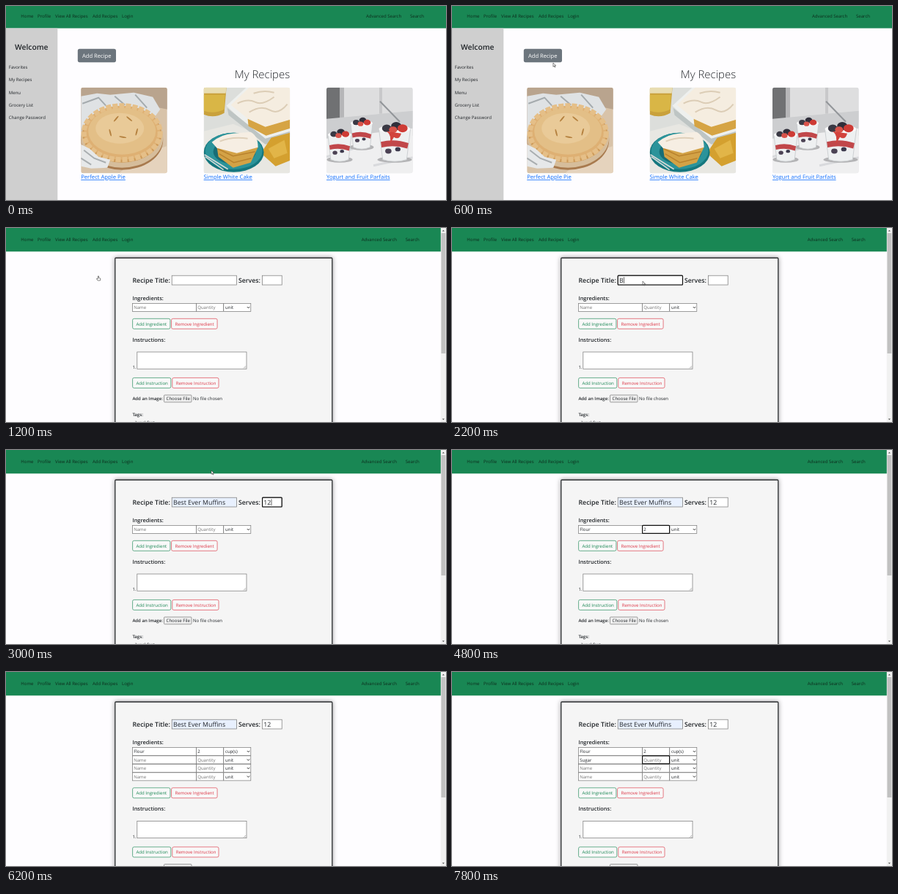
These frames come from a looping animation (600x266 px, 8 s). An HTML page:

```html
<!DOCTYPE html>
<html lang="en">
<head>
<meta charset="utf-8">
<title>My Recipes</title>
<style>
html, body { margin: 0; width: 100%; height: 100%; overflow: hidden; background: #fefdff; }
svg { display: block; width: 600px; height: 266px; }
text { font-family: "Open Sans", "Noto Sans", sans-serif; font-size: 6.05px; fill: #212529; text-rendering: geometricPrecision; white-space: pre; }
.b { font-weight: 600; }
.nav text { fill: #0d2d1d; }
.link { fill: #0d6efd; font-size: 7.68px; text-decoration: underline; }
.box { fill: #fff; stroke: #767676; stroke-width: .7; }
.hint { fill: #757575; }
#card { fill: #f5f5f5; stroke: #2b2e30; stroke-width: 1.3; filter: drop-shadow(0 0 3px rgba(0,0,0,.4)); }
#focus { fill: none; stroke: #101010; stroke-width: 1.2; }
</style>
</head>
<body>
<svg id="stage" viewBox="0 0 600 266"></svg>
<script>
const LOOP = 8000, STEP = 200, ROW = 11.5;
const stage = document.getElementById('stage');
const $ = id => document.getElementById(id);

const text = (x, y, s, attrs = '') => `<text x="${x}" y="${y}" ${attrs}>${s}</text>`;
const bold = (x, y, s, size) => text(x, y, s, `class="b" style="font-size:${size}px"`);
const rect = (x, y, w, h, attrs) => `<rect x="${x}" y="${y}" width="${w}" height="${h}" ${attrs}/>`;
const box = (x, y, w, h, attrs = '') => rect(x, y, w, h, 'class="box" ' + attrs);
const oval = (x, y, rx, ry, fill, more = '') => `<ellipse cx="${x}" cy="${y}" rx="${rx}" ry="${ry}" fill="${fill}" ${more}/>`;
const path = (d, fill, more = '') => `<path d="${d}" fill="${fill}" ${more}/>`;
const photo = (x, art) => `<svg x="${x}" y="111.7" width="117.5" height="117.5" viewBox="0 0 117.5 117.5"><g clip-path="url(#round)">${art}</g></svg>`;
const outline = (x, y, w, color, label) =>
  rect(x, y, w, 14, `rx="2" fill="#f8f8f8" stroke="${color}" stroke-width=".65"`) +
  text(x + 4.9, y + 9.2, label, `style="fill:${color}"`);

function navBar(h, y, shift) {
  const left = [[20.3, 'Home'], [43, 'Profile'], [67, 'View All Recipes'], [118, 'Add Recipes'], [158, 'Login']];
  const right = [[491 - shift, 'Advanced Search'], [551 - shift, 'Search']];
  return `<g class="nav">${rect(0, 0, 600, h, 'fill="#198754"')}` +
    [...left, ...right].map(([x, s]) => text(x, y, s)).join('') + '</g>';
}

function pie() {
  const slits = [[48, 43, -50], [66, 43, 40], [40, 62, 75], [76, 61, -75], [57, 68, 10]];
  return rect(0, 0, 118, 118, 'fill="#d8c3a9"') +
    path('M0 0H118V30L70 20 0 60Z', '#b9a48e') +
    path('M74 96 118 80V118H52Z', '#e5d3bd') +
    path('M0 12 22 8 40 10 72 7 98 13 108 30 98 44 70 26 40 28 20 42 0 60Z', '#dfe2e4') +
    path('M2 22 24 14 34 25 M46 12 60 24 M74 10 90 28', 'none', 'stroke="#a5abae" stroke-width="2"') +
    oval(56, 72, 56, 41, '#a87a4e') + oval(56, 69, 56, 41, '#d6bd9b') +
    oval(56, 64, 54, 39, '#cd9a59') +
    oval(56, 62, 52, 37, '#deb073', 'stroke="#e5bf88" stroke-width="7" stroke-dasharray="7 2"') +
    oval(56, 60, 46, 32, '#e3bf87') + oval(53, 56, 33, 21, '#e9ca98') +
    slits.map(([x, y, a]) => oval(x, y, 5, 1, '#b5813f', `transform="rotate(${a} ${x} ${y})"`)).join('') +
    path('M0 78 12 84 24 95 40 99 36 110 14 111 0 108Z', '#e6e8e9') +
    path('M4 86 18 97 34 103 M0 97 14 106', 'none', 'stroke="#a9aeb0" stroke-width="2"');
}

function cake() {
  return rect(0, 0, 118, 118, 'fill="#dcdedb"') +
    path('M0 60 40 50 118 82V118H0Z', '#e8e7e2') +
    path('M0 0H31L28 35Q14 43 0 37Z', '#c9a13c') + path('M0 10H29L28 30Q14 37 0 32Z', '#d9b646') +
    path('M0 0H31L30 8H0Z', '#e8ddb2') +
    path('M31 25 58 0H118V66L84 76Z', '#eef0ee') + path('M32 28 84 70 118 60V68L84 78 34 38Z', '#bec5c4') +
    path('M37 24 62 0H118V54L84 62Z', '#f5ede0') + path('M60 43 84 54 118 44V56L85 66 61 53Z', '#d6a444') +
    path('M46 22Q60 15 70 20T96 13 M62 34Q78 24 90 31T114 23 M68 8Q82 3 96 7', 'none', 'stroke="#dccdb6" stroke-width="2"') +
    path('M78 90 92 69 118 62V100L98 108Z', '#d4a02f') + path('M88 84 110 72 114 90 96 97Z', '#e2b548') +
    oval(41, 89, 41, 27, '#15777e') + oval(41, 87, 39, 25, '#2b939a') + oval(42, 88, 29, 17, '#176d76') +
    path('M17 75 57 78 74 82 64 103 40 110 20 95Z', '#d3a246') +
    path('M19 84 40 94 70 88 M21 91 41 103 65 97', 'none', 'stroke="#b9822d" stroke-width="1.5"') +
    path('M11 75Q24 64 40 63L64 61Q74 66 74 82L45 90 18 83Z', '#f6eee3') +
    path('M22 74Q38 67 60 70', 'none', 'stroke="#dfd0ba" stroke-width="2"') +
    path('M1 92 33 112 M2 95 27 113', 'none', 'stroke="#d5d9d7" stroke-width="1.6"');
}

function jar(x, y, w, h) {
  const r = w / 2, berry = (dx, dy, k, c) => oval(x + r * dx, y + dy, r * k, r * k * .8, c);
  return oval(x, y + h, r * 1.1, 4, '#b3b3b5') +
    path(`M${x - r} ${y}H${x + r}L${x + r * .76} ${y + h}Q${x} ${y + h + 5} ${x - r * .76} ${y + h}Z`, '#eef0f1', 'stroke="#c4c8cb" stroke-width=".8"') +
    path(`M${x - r * .88} ${y + h * .42}Q${x} ${y + h * .3} ${x + r * .88} ${y + h * .46}L${x + r * .8} ${y + h * .64}Q${x} ${y + h * .5} ${x - r * .83} ${y + h * .6}Z`, '#c1474a') +
    berry(-.4, h * .72, .2, '#4b4254') + berry(.2, h * .66, .17, '#3d3a4d') +
    oval(x, y, r, r * .25, '#fafafa') +
    berry(-.5, -1, .3, '#3a3944') + berry(.1, -4, .33, '#302e3a') + berry(.5, -1, .32, '#ce3b35') + berry(-.1, 1, .26, '#d9534a');
}

function parfait() {
  return rect(0, 0, 118, 118, 'fill="#e3e3e4"') +
    rect(0, 0, 118, 48, 'fill="#dededf"') + path('M0 0H18V45H0Z', '#707173') +
    path('M18 0H24V43H18Z', '#b6b6b8') + path('M72 0H76V36H72Z', '#c8c8ca') +
    path('M0 43 118 32V66L0 72Z', '#cdced0') + path('M0 70 118 56V118H0Z', '#efeff0') +
    path('M0 95 36 84 M64 107 118 96', 'none', 'stroke="#d9dadd" stroke-width="3"') +
    path('M73 19 100 47', 'none', 'stroke="#929599" stroke-width="2"') +
    jar(48, 49, 30, 33) + jar(18, 65, 32, 34) + jar(93, 57, 43, 42) +
    path('M82 60Q90 66 86 78L92 68Q99 73 102 63Z', '#d2433d');
}

function listPage() {
  const side = ['Favorites', 'My Recipes', 'Menu', 'Grocery List', 'Change Password'];
  return `<g id="list">${navBar(30.5, 16.2, 0)}` +
    rect(0, 30.5, 70.3, 236, 'fill="#cfcfcf"') + bold(12, 60.3, 'Welcome', 10.3) +
    side.map((s, i) => text(3.8, 86.2 + i * 17.2, s)).join('') +
    rect(97.8, 58.8, 52.2, 18.4, 'id="add" rx="2.6"') +
    text(104, 71.2, 'Add Recipe', 'style="fill:#fff;font-size:7.6px"') +
    text(311.7, 99.2, 'My Recipes', 'style="font-size:15px;font-weight:300"') +
    photo(102.2, pie()) + photo(269.6, cake()) + photo(437, parfait()) +
    text(102.2, 237, 'Perfect Apple Pie', 'class="link"') +
    text(269.6, 237, 'Simple White Cake', 'class="link"') +
    text(437, 237, 'Yogurt and Fruit Parfaits', 'class="link"') + '</g>';
}

function row(i) {
  const y = 103.4 + i * ROW, base = y + 7.8;
  return `<g id="row${i}">` + box(172.6, y, 87, 11) + box(259.6, y, 37, 11) + box(296.8, y, 37, 11) +
    text(174.2, base, '', `id="name${i}"`) + text(261.2, base, '', `id="qty${i}"`) +
    text(299, base, 'unit', `id="unit${i}"`) +
    path(`M328.8 ${y + 4.6}l1.7 1.8 1.7-1.8`, 'none', 'stroke="#222" stroke-width=".9"') + '</g>';
}

function formPage() {
  const green = '#198754', red = '#dc3545';
  return `<g id="form">${navBar(32.3, 18.2, 6.2)}` +
    rect(148.8, 41, 296, 260, 'id="card" rx="1"') +
    bold(172.4, 75.2, 'Recipe Title:', 8.85) + box(226.2, 65.2, 88.3, 12.8, 'id="titleBox"') +
    text(228, 75, '', 'id="title" style="font-size:8.75px"') +
    bold(317, 75.2, 'Serves:', 8.75) + box(349.6, 65.2, 26.6, 12.8) +
    text(351.3, 75, '', 'id="serves" style="font-size:8.75px"') +
    bold(172.4, 98.6, 'Ingredients:', 7.4) + [0, 1, 2, 3].map(row).join('') +
    '<g id="below">' +
    outline(172.6, 124.3, 51.3, green, 'Add Ingredient') + outline(225.6, 124.3, 62.5, red, 'Remove Ingredient') +
    bold(172.4, 155.7, 'Instructions:', 7.4) + text(172.4, 193.2, '1.') +
    box(178.8, 170, 149.2, 23.2) +
    path('M324 192.3l3-3M326 192.3l1-1', 'none', 'stroke="#777" stroke-width=".6"') +
    outline(172.6, 205.4, 52.2, green, 'Add Instruction') + outline(226.8, 205.4, 63.2, red, 'Remove Instruction') +
    bold(172.4, 236.2, 'Add an Image:', 6.02) +
    box(215.5, 229, 37.5, 9.8, 'rx="1" style="fill:#efefef"') + text(218.6, 236.1, 'Choose File') +
    text(255, 236.2, 'No file chosen') + bold(172.4, 257.5, 'Tags:', 6.05) + text(176.2, 269, 'breakfast') + '</g>' +
    rect(0, 0, 0, 0, 'id="focus" rx="1"') + rect(0, 0, .6, 0, 'id="caret"') +
    rect(592.8, 0, 7.2, 266, 'fill="#f1f1f1"') + rect(593.5, 7, 5.8, 165, 'fill="#c1c1c1"') +
    path('M594.8 4.6h3.2l-1.6-1.9z', '#505050') + path('M594.8 261.4h3.2l-1.6 1.9z', '#505050') + '</g>';
}

stage.innerHTML = `<defs><clipPath id="round">${rect(0, 0, 117.5, 117.5, 'rx="3"')}</clipPath></defs>` +
  listPage() + formPage() +
  '<g id="pointer" stroke="#222" stroke-width=".55" stroke-linejoin="round">' +
  path('M-.6-3Q0-3.7.6-3V-.6L2.6 0Q3 1 2.4 3H-.9L-2.6.6Q-2-.2-.6.7Z', '#fff', 'id="hand"') +
  path('M0 0V5.2L1.3 4 2.2 6 3 5.6 2.1 3.7H3.7Z', '#fff', 'id="arrow"') + '</g>';

// Each track lists [time, value]; a value holds until the next entry.
const track = {
  title: [[0, ''], [2200, 'B'], [2400, 'Best Ever Muffins']],
  serves: [[0, ''], [2800, '1'], [3000, '12']],
  name0: [[0, ''], [3800, 'F'], [4000, 'Flo'], [4200, 'Flour']],
  qty0: [[0, ''], [4800, '2']],
  unit0: [[0, 'unit'], [5200, 'cup(s)']],
  name1: [[0, ''], [6600, 'S'], [6800, 'Su'], [7000, 'Suga'], [7200, 'Sugar']],
  focus: [[0, ''], [2000, 'title'], [2600, 'serves'], [3400, 'name0'], [4400, 'qty0'], [5000, 'unit0'],
    [5600, ''], [6400, 'name1'], [7600, 'qty1']],
  rows: [[0, 1], [5600, 2], [5800, 3], [6000, 4]]
};
const moves = [[200, 172, 104], [800, 126, 69], [1400, 126, 69], [2000, 258, 73], [2400, 262, 73], [3000, 280, 28]];
const fields = ['title', 'serves', 'name0', 'qty0', 'name1', 'name2', 'name3', 'qty1', 'qty2', 'qty3', 'unit0'];

const at = (list, t) => list.filter(k => k[0] <= t).pop()[1];
const show = (id, on) => $(id).setAttribute('visibility', on ? 'inherit' : 'hidden');
const set = (id, attrs) => Object.entries(attrs).forEach(([k, v]) => $(id).setAttribute(k, v));

function place(t) {
  const i = moves.findIndex(m => m[0] > t);
  if (i < 0) return moves[moves.length - 1].slice(1);
  const [t0, x0, y0] = moves[Math.max(0, i - 1)], [t1, x1, y1] = moves[i];
  let p = t1 > t0 ? (t - t0) / (t1 - t0) : 0;
  p = p * p * (3 - 2 * p);
  return [x0 + (x1 - x0) * p, y0 + (y1 - y0) * p];
}

function fieldBox(id) {
  if (id === 'title') return [226.2, 65.2, 88.3, 12.8];
  if (id === 'serves') return [349.6, 65.2, 26.6, 12.8];
  const y = 103.4 + id.slice(-1) * ROW;
  if (id.startsWith('name')) return [172.6, y, 87, 11];
  return [id.startsWith('qty') ? 259.6 : 296.8, y, 37, 11];
}

function draw(t) {
  const onForm = t >= 1200, rows = at(track.rows, t), focus = at(track.focus, t);
  show('list', !onForm);
  show('form', onForm);
  $('add').setAttribute('fill', t >= 800 ? '#5c636a' : '#6c757d');

  for (const id of fields) {
    const value = track[id] ? at(track[id], t) : '';
    const hint = id.startsWith('name') ? 'Name' : id.startsWith('qty') ? 'Quantity' : '';
    $(id).textContent = value || hint;
    $(id).setAttribute('class', value ? '' : 'hint');
  }
  $('titleBox').style.fill = t >= 2400 ? '#e8f0fe' : '#fff';
  for (let i = 0; i < 4; i++) show('row' + i, i < rows);
  $('below').setAttribute('transform', `translate(0 ${(rows - 1) * ROW})`);

  show('focus', onForm && focus);
  show('caret', onForm && focus && focus !== 'unit0' && t % 1000 < 500);
  if (focus) {
    const [x, y, width, height] = fieldBox(focus);
    set('focus', { x, y, width, height });
    const typed = track[focus] && at(track[focus], t);
    const end = typed ? $(focus).getComputedTextLength() : 0;
    set('caret', { x: +$(focus).getAttribute('x') + end + .4, y: y + 2, height: height - 4 });
  }

  const hand = t >= 800 && t <= 1400;
  show('pointer', t >= 200 && t < 3800);
  show('hand', hand && t < 3800);
  show('arrow', !hand && t >= 200 && t < 3800);
  $('pointer').setAttribute('transform', `translate(${place(t)})`);
}

const start = performance.now();
function tick() {
  const t = (performance.now() - start) % LOOP;
  draw(Math.floor(t / STEP) * STEP);
  requestAnimationFrame(tick);
}
draw(0);
requestAnimationFrame(tick);
</script>
</body>
</html>
```
